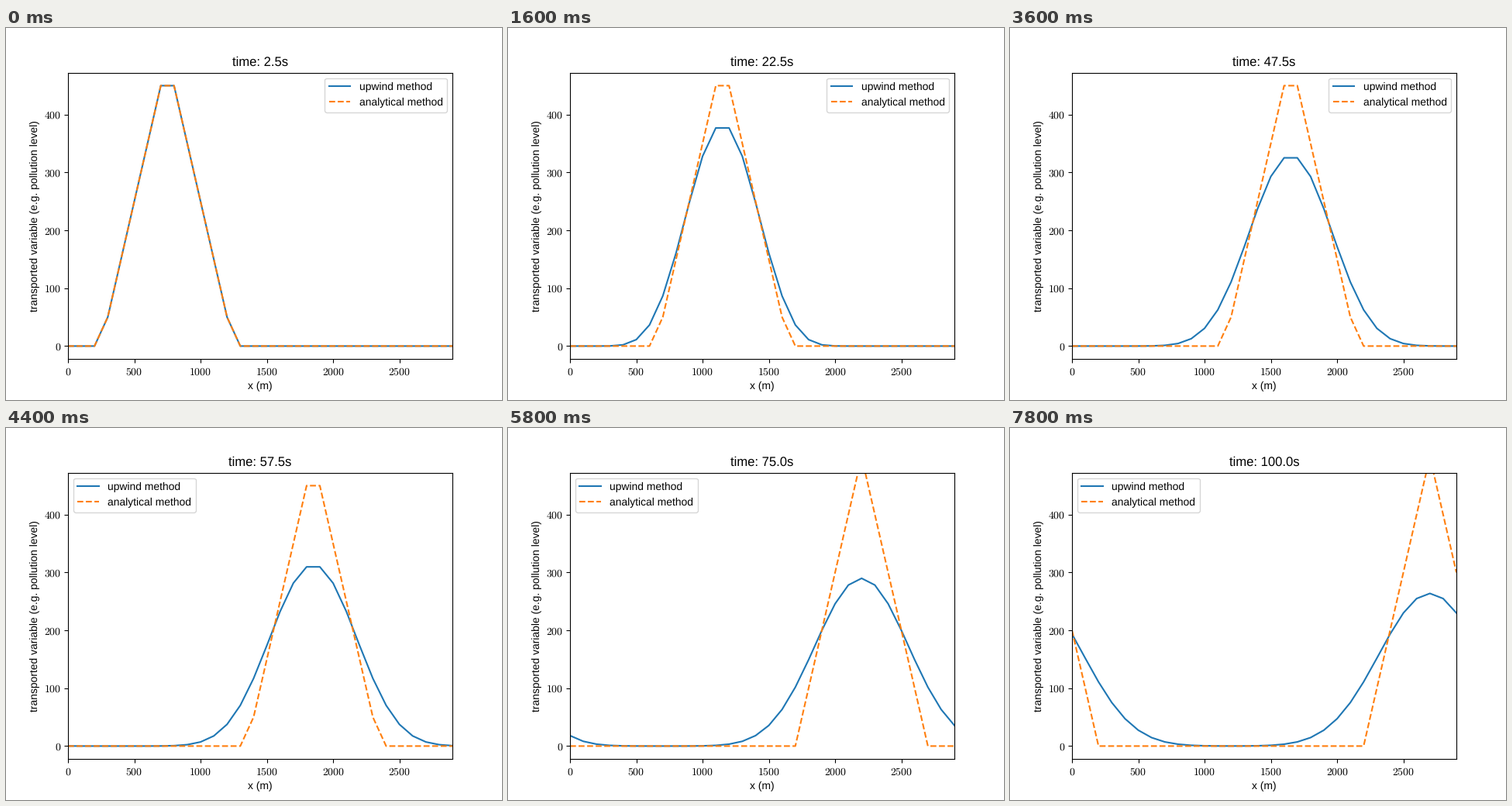
Recreate the animation shown at these times as a matplotlib script. Size 640 by 480 pixels, loop 8000 ms.

```python
import numpy as np
import matplotlib.pyplot as plt
from matplotlib.animation import FuncAnimation

plt.rcParams.update({
    "font.family": "Liberation Sans",
    "mathtext.fontset": "cm",
    "font.size": 10 * 72 / 72.27,  # ten TeX points
    "text.hinting": "none",
    "ytick.major.pad": 2.8,  # math text carries a pixel of its own padding
})

DX, DT, SPEED = 100, 2.5, 20
CELLS, STEPS = 30, 40
LENGTH = CELLS * DX
COURANT = SPEED * DT / DX
PEAK_X, PEAK = 700, 500

x = np.arange(CELLS) * DX


def analytical(t):
    """Triangular pulse carried along a periodic domain."""
    offset = (x - PEAK_X - SPEED * t + LENGTH / 2) % LENGTH - LENGTH / 2
    return np.maximum(PEAK - np.abs(offset), 0)


def upwind_states():
    state, states = analytical(0), []
    for _ in range(STEPS):
        state = state - COURANT * (state - np.roll(state, 1))
        states.append(state)
    return states


states = upwind_states()

fig, ax = plt.subplots(figsize=(6.4, 4.8), dpi=100)
numeric, = ax.plot(x, states[0], label="upwind method")
exact, = ax.plot(x, analytical(DT), "--", label="analytical method")
title = ax.set_title("")
ax.set_xlim(0, x[-1])
ax.set_ylim(-22.5, 472.5)
ax.set_xticks(range(0, 2501, 500))
ax.set_yticks(range(0, 401, 100))
for axis in (ax.xaxis, ax.yaxis):
    axis.set_major_formatter(lambda value, pos: f"${value:.0f}$")
ax.set_xlabel("x (m)")
ax.set_ylabel("transported variable (e.g. pollution level)", labelpad=3.3)
ax.legend(loc="best")


def update(step):
    t = DT * (step + 1)
    numeric.set_ydata(states[step])
    exact.set_ydata(analytical(t))
    title.set_text(f"time: {t:.1f}s")
    return numeric, exact, title


anim = FuncAnimation(fig, update, frames=STEPS, interval=200,
                     init_func=lambda: update(0), repeat=True, repeat_delay=0)
plt.show()
```
